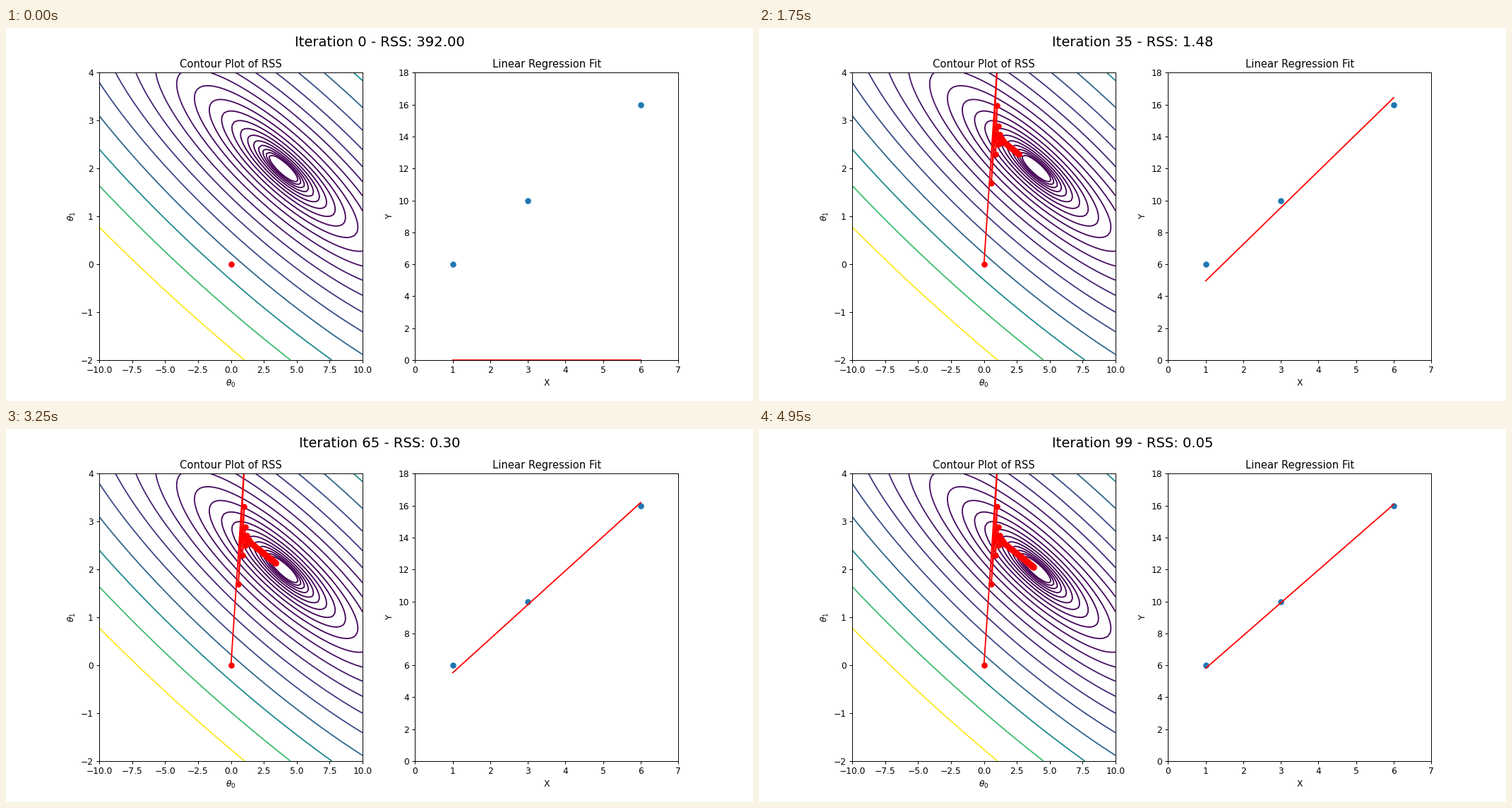
Recreate the animation shown at these times as a matplotlib script. Size 1058x529 px, loop 5 s.

```python
import numpy as np
import matplotlib.pyplot as plt
from matplotlib.animation import FuncAnimation

WIDTH, HEIGHT = 1058, 529
DPI = WIDTH / 12
FRAMES, INTERVAL = 100, 50
LEARNING_RATE = 0.1

X = np.array([1, 3, 6])
Y = np.array([6, 10, 16])


def rss(t0, t1):
    return sum((y - t0 - t1 * x) ** 2 for x, y in zip(X, Y))


def gradient_descent(steps):
    path = np.zeros((steps, 2))
    for i in range(1, steps):
        t0, t1 = path[i - 1]
        error = Y - t0 - t1 * X
        path[i] = path[i - 1] + LEARNING_RATE * np.array([error.mean(), (error * X).mean()])
    return path


path = gradient_descent(FRAMES)

plt.rcParams["font.family"] = "DejaVu Sans"
fig, (ax_contour, ax_fit) = plt.subplots(1, 2, figsize=(12, 6), dpi=DPI)
title = fig.suptitle("", fontsize=16)

grid0, grid1 = np.meshgrid(np.linspace(-10, 10, 100), np.linspace(-2, 4, 100))
ax_contour.contour(grid0, grid1, rss(grid0, grid1), levels=np.logspace(0, 3, 20), cmap="viridis")
trail, = ax_contour.plot([], [], "ro-")
ax_contour.set(xlim=(-10, 10), ylim=(-2, 4), title="Contour Plot of RSS",
               xlabel=r"$\theta_0$", ylabel=r"$\theta_1$")

ax_fit.scatter(X, Y)
fit, = ax_fit.plot([], [], "r-")
ax_fit.set(xlim=(0, 7), ylim=(0, 18), title="Linear Regression Fit", xlabel="X", ylabel="Y")


def update(i):
    t0, t1 = path[i]
    trail.set_data(path[:i + 1, 0], path[:i + 1, 1])
    fit.set_data(X, t0 + t1 * X)
    title.set_text(f"Iteration {i} - RSS: {rss(t0, t1):.2f}")
    return trail, fit, title


anim = FuncAnimation(fig, update, frames=FRAMES, interval=INTERVAL, repeat=True, repeat_delay=0)
plt.show()
```
